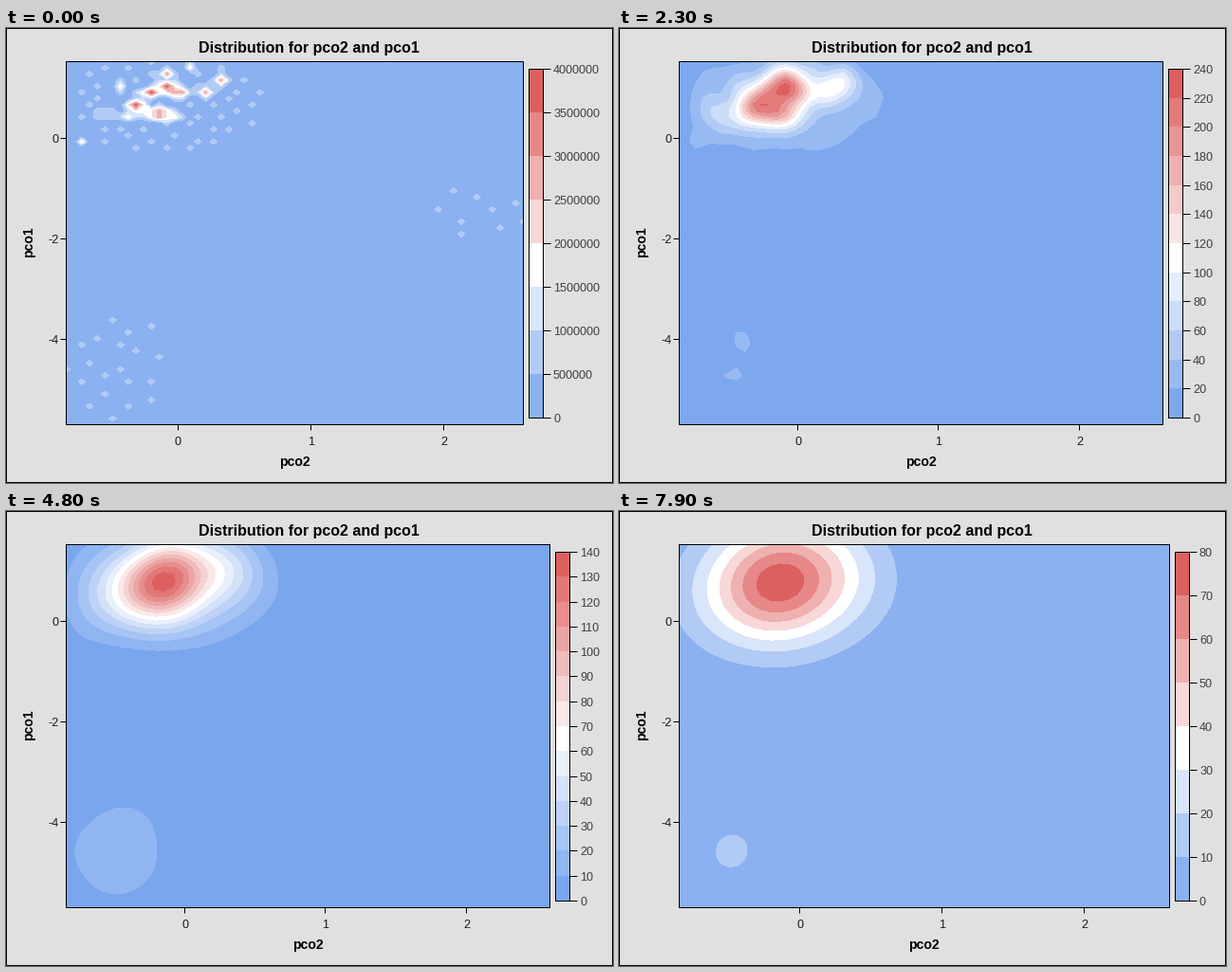
Animation, 640 px wide and 480 px high, one loop 8000 ms. Source, as a matplotlib script:

```python
import numpy as np
import matplotlib.pyplot as plt
from matplotlib.animation import FuncAnimation
from matplotlib.colors import to_rgb
from matplotlib.patches import Rectangle

W, H, DPI = 640, 480, 100
PX = 72 / DPI
FRAMES, INTERVAL = 80, 100
LEFT, TOP, BOTTOM = 63.5, 35.5, 418.5
BAR_TOP, BAR_BOTTOM = 43.5, 411.5
XMIN, XMAX, YMIN, YMAX = -0.8465, 2.597, -5.698, 1.528
BLUE, WHITE, RED = (np.array(to_rgb(c)) for c in ("#6497EB", "#FFFFFF", "#DD6060"))
plt.rcParams["path.snap"] = False

N = 60            # density grid, N x N, rows counted from the top
HX, HY = 4.3, 6.0  # full bandwidth in grid steps
GRID = np.arange(N)

# Dense spots of the main group: column, row, height.
SPOTS = [(9, 7, 4), (11, 5, 4), (13, 4, 4), (14, 5, 2), (15, 5, 2),
         (12, 8.5, 4.8), (10, 8, 2), (14, 9, 2), (8, 9, 2), (13, 2, 2.55),
         (20, 3, 3), (18, 5, 3), (5, 8, 1.2), (5, 9, 1.2)]
PAIRS = [(7, 4), (2, 13), (16, 1)]

# Bandwidth multiplier and highest density along the way.
STEPS = np.array([0, 4, 12, 23, 39, 58, 79])
PEAKS = [3.66e6, 1420, 330, 232, 170, 113, 77.5]


def multiplier(k):
    return 0.001 + 0.0125 * k


def bell(center, width):
    return np.exp(-0.5 * ((GRID - center) / width) ** 2)


def scatter(counts, n, cx, cy, rx, ry, power=0.5):
    """Single observations spread over an ellipse along a golden spiral."""
    k = np.arange(n)
    r, a = ((k + 0.5) / n) ** power, 2.4 * k
    i = np.rint(cx + rx * r * np.cos(a)).astype(int)
    j = np.rint(cy + ry * r * np.sin(a)).astype(int)
    ok = (i >= 0) & (i < N) & (j >= 0) & (j < N)
    counts[j[ok], i[ok]] = np.maximum(counts[j[ok], i[ok]], 1)


def observations():
    spots = sum(a * np.outer(bell(y, 0.58), bell(x, 0.75)) for x, y, a in SPOTS)
    counts = np.minimum(np.rint(spots), 4)
    for x, y in PAIRS:
        counts[y, x] = 2
    scatter(counts, 70, 13, 6.5, 12.5, 8.5, 0.6)
    scatter(counts, 20, 6.3, 49.5, 7, 9)
    scatter(counts, 9, 53, 24.5, 7, 4.5)
    return counts


COUNTS = observations()


def density(k):
    m = multiplier(k)
    smooth_x = np.array([bell(c, HX * m) for c in GRID])
    smooth_y = np.array([bell(c, HY * m) for c in GRID])
    field = smooth_y @ COUNTS @ smooth_x
    peak = np.exp(np.interp(np.log(m), np.log(multiplier(STEPS)), np.log(PEAKS)))
    return field * peak / field.max(), peak


def nice_step(peak):
    base = 10 ** np.floor(np.log10(peak / 10))
    lead = peak / 10 / base
    for limit, step in ((1.38, 1), (2.4, 2), (3.52, 2.5), (7, 5)):
        if lead < limit:
            return step * base
    return 10 * base


def ramp(t):
    if t < 0.5:
        return BLUE + (WHITE - BLUE) * 2 * t
    return WHITE + (RED - WHITE) * (2 * t - 1)


fig = plt.figure(figsize=(W / DPI, H / DPI), dpi=DPI, facecolor="#E0E0E0")
ax = fig.add_axes([0, 0, 1, 1])


def crisp(v):
    return np.floor(v) + 0.5


def line(x0, y0, x1, y1):
    ax.plot([x0, x1], [y0, y1], color="black", lw=PX, solid_capstyle="butt", zorder=5)


def box(x0, y0, x1, y1, face="none", edge="black", z=4):
    ax.add_patch(Rectangle((x0, y0), x1 - x0, y1 - y0, facecolor=face,
                           edgecolor=edge, lw=PX, zorder=z))


def text(x, y, s, size=12.6, ha="center", color="#1A1A1A", **kw):
    ax.text(x, y, s, fontsize=size * PX, ha=ha, va="baseline", color=color,
            family="Liberation Sans", **kw)


def draw_axes(right):
    bold = dict(color="black", weight="bold")
    for v in (0, 1, 2):
        x = crisp(LEFT + (v - XMIN) / (XMAX - XMIN) * (right - LEFT))
        line(x, BOTTOM, x, BOTTOM + 6)
        text(x, 439.5, str(v))
    for v in (0, -2, -4):
        y = crisp(TOP + (YMAX - v) / (YMAX - YMIN) * (BOTTOM - TOP))
        line(LEFT - 6, y, LEFT, y)
        text(55.5, y + 4.5, str(v), ha="right")
    text(319, 26, "Distribution for pco2 and pco1", 16, **bold)
    text((LEFT + right) / 2 - 0.5, 462, "pco2", 14, **bold)
    text(28, 225.5, "pco1", 14, rotation=90, rotation_mode="anchor", **bold)


def draw_legend(right, step, colors):
    x0, x1 = right + 6, right + 21
    edges = crisp(np.linspace(BAR_BOTTOM, BAR_TOP, len(colors) + 1))
    for color, y0, y1 in zip(colors, edges, edges[1:]):
        box(x0, y0 - 0.5, x1, y1 - 0.5, color, "none", 3)
    box(x0, BAR_BOTTOM, x1, BAR_TOP)
    for i, y in enumerate(edges):
        line(x1, y, x1 + 8, y)
        text(x1 + 10.5, y + 4.5, str(int(round(i * step))), ha="left", color="#404040")


def draw(k):
    ax.clear()
    ax.axis("off")

    field, peak = density(k)
    step = nice_step(peak)
    n = int(np.ceil(peak / step))
    colors = [ramp((i + 1) / n) for i in range(n)]
    right = 594.5 - 7 * len(str(int(round(n * step))))

    box(LEFT, TOP, right, BOTTOM, colors[0], "none", 1)
    ax.contourf(np.linspace(LEFT, right, N), np.linspace(TOP, BOTTOM, N), field,
                levels=step * np.arange(1, n + 1), colors=colors[1:], zorder=2)
    box(LEFT, TOP, right, BOTTOM)
    draw_axes(right)
    draw_legend(right, step, colors)
    box(0.5, 0.5, W - 0.5, H - 0.5)
    ax.set_xlim(0, W)
    ax.set_ylim(H, 0)
    return []


anim = FuncAnimation(fig, draw, frames=FRAMES, interval=INTERVAL,
                     init_func=lambda: [], repeat=True, repeat_delay=0)
plt.show()
```
